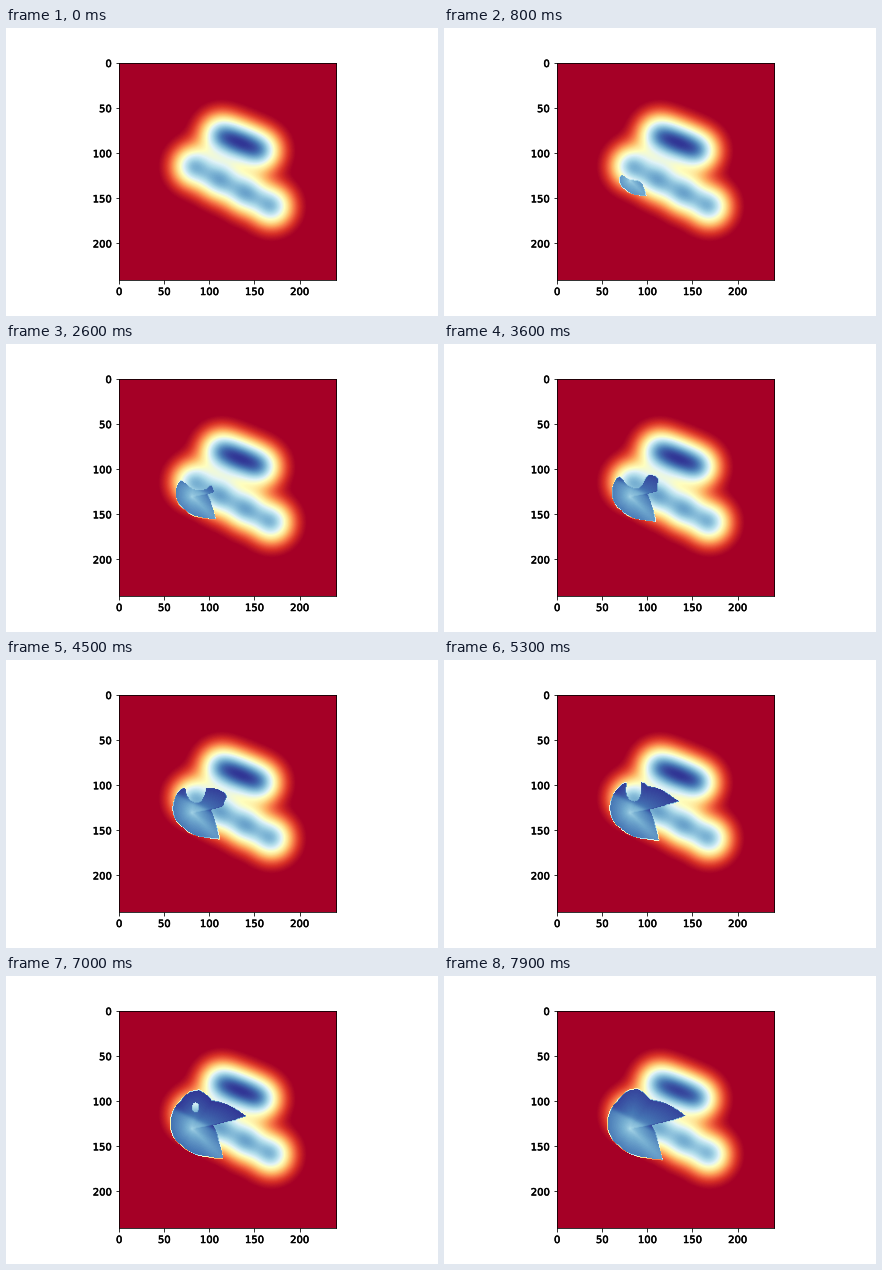
These frames come from a looping animation (432 by 288 pixels, 8 s). A matplotlib script:

```python
import numpy as np
import matplotlib.pyplot as plt
import matplotlib.patheffects as pe
from matplotlib.animation import FuncAnimation

N = 241
FRAMES, STEP = 80, 100
END = 7.9  # seconds until the front reaches its outline
LEFT, TOP, SCALE = 112.68, 34.56, 217.44 / N

plt.rcParams.update({"font.family": "DejaVu Sans", "font.size": 10})

# Cell centres in stage pixels
cell = (np.arange(N) + 0.5) * SCALE
X, Y = np.meshgrid(LEFT + cell, TOP + cell)


def bump(cx, cy, sx, sy=None):
    return np.exp(-((X - cx) / sx) ** 2 / 2 - ((Y - cy) / (sy or sx)) ** 2 / 2)


def chain(start, end, count):
    """Sum of equal bumps along a line."""
    pts = np.linspace(start, end, count)
    return sum(bump(x, y, 13) for x, y in pts)


def make_field():
    f = chain((214, 107), (254, 123), 3) + chain((187, 138.5), (265, 178.5), 4)
    f = (f / f.max()) ** 0.72
    return np.clip((f - 0.05) / 0.95, 0, 1)


def make_front():
    """Arrival time and cost of a front that spreads from a seed."""
    seed = np.array([185.5, 153])
    outline = np.array([(218, 184), (202, 182), (188, 179), (175, 170), (165, 158),
                        (163, 147), (165, 137), (173, 125), (183, 115), (193, 113),
                        (206, 124), (224, 129), (241, 140), (230, 144), (207, 149.5),
                        (213, 165)]) - seed
    dx, dy = X - seed[0], Y - seed[1]
    angle = np.arctan2(dy, dx)
    inv_radius = np.interp(angle, np.arctan2(outline[:, 1], outline[:, 0]),
                           1 / np.hypot(outline[:, 0], outline[:, 1]),
                           period=2 * np.pi)
    q = np.hypot(dx, dy) * inv_radius

    # The lower chain acts as a wall, its blobs as slow spots
    across = (X - 187) * 0.456 - (Y - 138.5) * 0.89
    wall = 1 / (1 + np.exp(-(across + 4) / 1.2))
    delay = 1.6 * wall + 6 * bump(189, 132, 7, 10) + 3 * bump(222, 146, 9)
    delay = np.minimum(delay, END - 0.1)
    arrival = delay + (END - delay) * (0.8 * q ** (4 + 3 * wall) + 0.2 * q ** 2)

    streak = np.exp(-((angle - 0.73) / 0.32) ** 2)
    cost = 0.69 + 0.22 * np.sqrt(q) + 0.09 * wall - 0.06 * q * streak
    return arrival, cost


field = make_field()
arrival, cost = make_front()

fig, ax = plt.subplots(figsize=(6, 4), dpi=72, facecolor="white")
fig.subplots_adjust(left=0.125, right=0.9, bottom=0.125, top=0.88)
img = ax.imshow(field, cmap="RdYlBu", vmin=0, vmax=1)
ax.set_xticks(range(0, 201, 50))
ax.set_yticks(range(0, 201, 50))
for label in ax.get_xticklabels() + ax.get_yticklabels():
    label.set_path_effects([pe.withStroke(linewidth=0.5, foreground="black")])


def update(i):
    t = i * STEP / 1000
    peak = 1 + 0.025 * np.clip((t - 7.2) / 0.7, 0, 1)
    visited = (arrival <= t) & (i > 0)
    img.set_data(np.where(visited, np.minimum(cost, peak), field))
    img.set_clim(0, peak)
    return [img]


anim = FuncAnimation(fig, update, frames=FRAMES, interval=STEP, repeat=True,
                     repeat_delay=0, blit=False)
plt.show()
```
